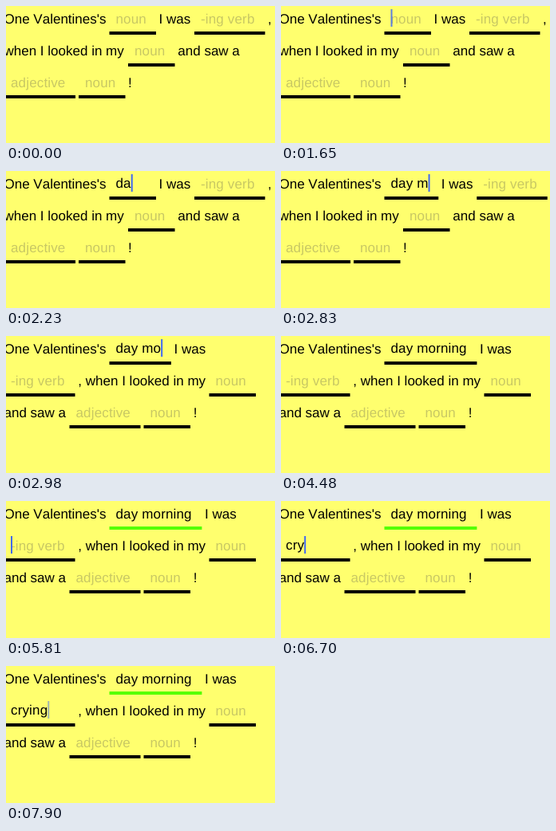
These frames come from a looping animation (337x172 px, 8000 ms). An HTML page:

```html
<!DOCTYPE html>
<html lang="en">
<head>
<meta charset="utf-8">
<title>Fill in the blanks</title>
<style>
  html, body { margin: 0; width: 100%; height: 100%; overflow: hidden; background: #ffff6e; }
  svg { display: block; width: 337px; height: 172px; }
  text {
    font: 17px "Liberation Sans", Arial, sans-serif;
    font-kerning: none;
    white-space: pre;
    text-rendering: geometricPrecision;
  }
  .entry { letter-spacing: .15px; }
  .hint { fill: #c8c864; }
  #caret { fill: #426bf2; }
</style>
</head>
<body>
<svg id="stage" viewBox="0 0 337 172"></svg>
<script>
const LOOP = 8000, ROW = 40, LEFT = -2, MARGIN = -2.5, FIRST = 129.5;
const PAD = 8, GAP = 3.6, SHORT = 58.5, LONG = 88.5;
const stage = document.getElementById('stage');

function add(tag, attrs, parent = stage) {
  const el = document.createElementNS('http://www.w3.org/2000/svg', tag);
  for (const name in attrs) el.setAttribute(name, attrs[name]);
  return parent.appendChild(el);
}

function place(el, x, row) {
  el.setAttribute('transform', `translate(${x} ${row * ROW})`);
}

function word(text) {
  const g = add('g', {});
  add('text', { y: 22 }, g).textContent = text;
  return g;
}

function field(hint, width) {
  const g = add('g', {});
  const line = add('rect', { y: 32, width, height: 4 }, g);
  const text = add('text', { x: PAD, y: 22, class: 'entry hint' }, g);
  text.textContent = hint;
  return { g, line, text, hint, width, size: 0 };
}

const opening = word("One Valentines's");
const noun1 = field('noun', SHORT);
const was = word('I was');
const verb = field('-ing verb', LONG);
const comma = word(',');
const looked = word('when I looked in my');
const noun2 = field('noun', SHORT);
const saw = word('and saw a');
const adjective = field('adjective', LONG + .5);
const noun3 = field('noun', SHORT);
const bang = word('!');
const caret = add('rect', { id: 'caret', width: 2, height: 22 });
place(opening, MARGIN, 0);
place(noun1.g, FIRST, 0);

// [start time, value] pairs
const morning = [
  [0, ''], [1950, 'd'], [2090, 'da'], [2240, 'day'], [2380, 'day '],
  [2830, 'day m'], [2980, 'day mo'], [3130, 'day morn'],
  [3430, 'day morni'], [3580, 'day mornin'], [3730, 'day morning']
];
const crying = [
  [0, ''], [6250, 'c'], [6550, 'cr'], [6700, 'cry'], [7150, 'cryin'], [7300, 'crying']
];
const blink = [
  [0, 0], [600, 1], [1200, .5], [1350, 0], [1650, .85], [1800, 1],
  [4330, .5], [4480, 0], [4780, 1], [5220, .7], [5370, .35], [5510, 0],
  [5810, 1], [7900, .5]
];
const FOCUS_VERB = 4780;

const at = (steps, t) => steps.findLast(([start]) => start <= t)[1];

// Text sits one pixel higher while its field has focus.
function fill(f, value, focused) {
  f.text.textContent = value || f.hint;
  f.text.classList.toggle('hint', !value);
  f.text.setAttribute('y', value && focused ? 21 : 22);
  f.size = value ? f.text.getComputedTextLength() : 0;
  const width = Math.max(f.width, f.size + 20.7);
  f.line.setAttribute('width', width);
  return width;
}

function layout(nounWidth) {
  const wasX = FIRST + nounWidth + GAP;
  const verbX = wasX + 44.4;
  place(was, wasX, 0);
  if (verbX + LONG < 337) {
    place(verb.g, verbX, 0);
    place(comma, verbX + LONG + GAP, 0);
    place(looked, MARGIN, 1);
    place(noun2.g, 153, 1);
    place(saw, 215.3, 1);
    place(adjective.g, LEFT, 2);
    place(noun3.g, 91, 2);
    place(bang, 153, 2);
  } else {
    place(verb.g, LEFT, 1);
    place(comma, 90.3, 1);
    place(looked, 99.8, 1);
    place(noun2.g, 254.5, 1);
    place(saw, MARGIN, 2);
    place(adjective.g, 79.5, 2);
    place(noun3.g, 172.5, 2);
    place(bang, 234.7, 2);
  }
}

function render(t) {
  const onVerb = t >= FOCUS_VERB;
  layout(fill(noun1, at(morning, t), !onVerb));
  fill(verb, at(crying, t), onVerb);
  noun1.line.setAttribute('fill', onVerb ? '#5f0' : '#000');
  const x = onVerb ? LEFT + verb.size : FIRST + noun1.size;
  caret.setAttribute('x', x + PAD);
  caret.setAttribute('y', onVerb ? 4 + ROW : 4);
  caret.setAttribute('opacity', at(blink, t));
}

const begin = performance.now();
function tick() {
  render((performance.now() - begin) % LOOP);
  requestAnimationFrame(tick);
}
tick();
</script>
</body>
</html>
```
